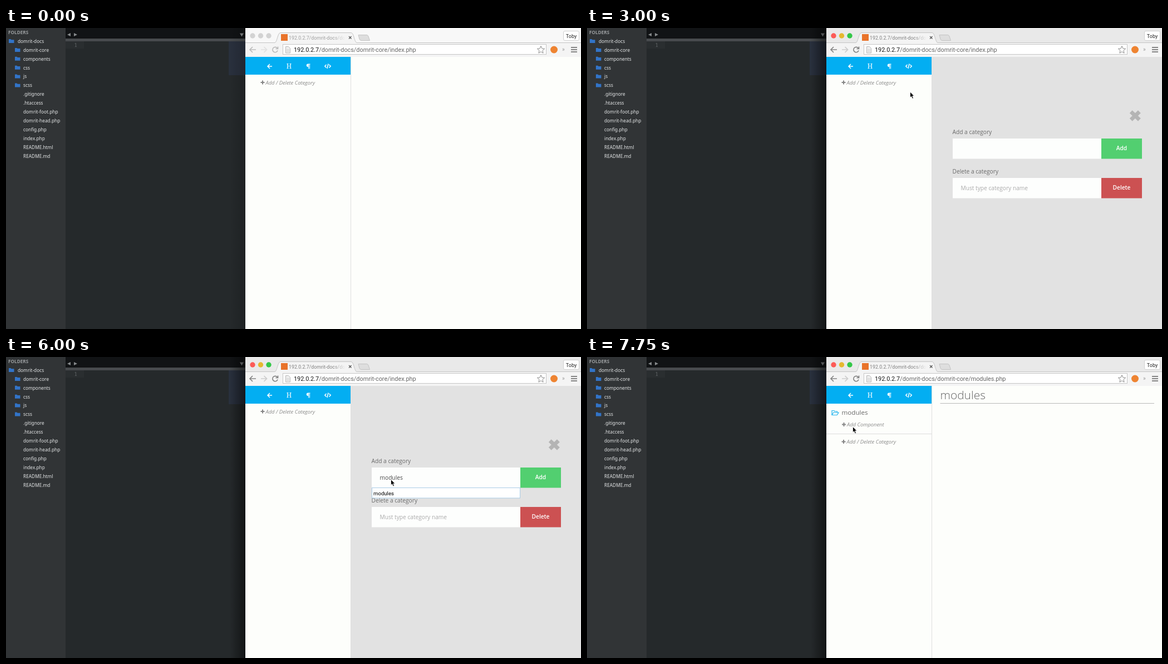
Animation, 1033 px wide and 542 px high, one loop 8 s. Source, as an HTML page:

```html
<!DOCTYPE html>
<html lang="en">
<head>
<meta charset="utf-8">
<title>Adding a category</title>
<style>
  html, body { margin: 0; width: 100%; height: 100%; overflow: hidden; background: #fdfefb; }
  svg { display: block; width: 100%; height: 100%; }
  text { white-space: pre; font-family: "Open Sans", sans-serif; }
  .tree { font: 8.3px "Noto Sans", sans-serif; fill: #e4e6e7; }
  .ui { font-family: Roboto, sans-serif; }
  .form { font-size: 10.2px; fill: #6a6a6a; }
  .button { font-size: 10.2px; fill: #fff; text-anchor: middle; font-weight: 600; }
  .action text { font-size: 9.4px; font-style: italic; fill: #8c8c8c; }
  .action path { stroke: #858585; stroke-width: 2; }
  .icon { fill: none; stroke: #fff; stroke-width: 1.5; }
  .nav { fill: none; stroke: #858585; stroke-width: 1.7; }
  .inactive .nav { stroke: #bcbcbc; }
  .inactive .light { fill: #d3d3d3; }
  .inactive #strip { fill: #f8f8f8; }
  .inactive #tabTitle { fill: #a0a0a0; }
  .inactive #shadow { opacity: .35; }
</style>
</head>
<body>
<svg viewBox="0 0 1033 542">
  <defs>
    <linearGradient id="shade"><stop offset="0" stop-opacity="0"/><stop offset="1" stop-opacity=".5"/></linearGradient>
    <linearGradient id="fade" gradientUnits="userSpaceOnUse" x1="588" x2="610">
      <stop offset="0" stop-color="#fff"/><stop offset="1" stop-color="#fff" stop-opacity="0"/>
    </linearGradient>
    <mask id="titleMask"><rect x="506" y="8" width="104" height="18" fill="url(#fade)"/></mask>
    <path id="folder" fill="#3274c8" d="M0 -3.5h3.6l1 1.2h4.9v5.8h-9.5z"/>
  </defs>

  <!-- Editor -->
  <rect width="430" height="542" fill="#25292b"/>
  <rect x="107" width="323" height="19" fill="#111315"/>
  <rect x="107" y="19" width="323" height="5" fill="#484b4e"/>
  <rect x="107" y="24" width="33" height="13" fill="#2a2e30"/>
  <rect x="400" y="24" width="30" height="61" fill="#29303d"/>
  <path fill="#85888a" d="M116 9v6l-6-3zM122 9v6l6-3zM420 9.5h7l-3.5 6z"/>
  <text x="122.5" y="34" font-size="9" fill="#626668" style="font-family:'Noto Sans Mono',monospace">1</text>
  <rect width="107" height="542" fill="#313436"/>
  <text x="4" y="11" font-size="8.2" font-weight="700" fill="#999c9e">FOLDERS</text>
  <g id="tree"></g>
  <rect id="shadow" x="402" width="28" height="542" fill="url(#shade)"/>

  <!-- Browser -->
  <g id="browser">
    <rect id="strip" x="430" width="603" height="27" fill="#e9e9e9"/>
    <rect x="430" y="26" width="603" height="26" fill="#f4f4f4"/>
    <path d="M430 26.5H483C487 26 488 8.500 493 8.500H620C625 8.500 626 26 630 26.500H1033" fill="#f4f4f4" stroke="#c4c4c4"/>
    <path d="M633 12.500H648Q650 12.500 651 15L653.500 22.500H638Q636 22.500 635 20Z" fill="#dedede" stroke="#c4c4c4"/>
    <circle class="light" cx="443" cy="14" r="4.700" fill="#fc5b57"/>
    <circle class="light" cx="457.500" cy="14" r="4.700" fill="#e5b82f"/>
    <circle class="light" cx="472" cy="14" r="4.700" fill="#33c748"/>
    <rect id="favicon" x="494" y="11" width="12" height="12" fill="#e9732a"/>
    <path id="spinner" d="M501 12.500A4.500 4.500 0 0 1 505.500 17" fill="none" stroke="#8b8b8b" stroke-width="1.200"/>
    <text id="tabTitle" class="ui" x="508" y="20.500" font-size="8.800" fill="#808080" mask="url(#titleMask)">192.0.2.7/domrit-docs/domrit-core</text>
    <path d="M616 15l4.500 4.500m0-4.500l-4.500 4.500" stroke="#555" stroke-width="1.300"/>
    <rect x="1001.500" y="5.500" width="28" height="17" rx="2.500" fill="#fff" stroke="#d0d0d0"/>
    <text class="ui" x="1015.500" y="17.500" font-size="9" text-anchor="middle" fill="#222">Toby</text>

    <path class="nav" d="M449 39H438.500M443 34l-5 5 5 5"/>
    <path class="nav" d="M458 39H468M463.500 34l5 5-5 5" opacity=".35"/>
    <path class="nav" id="reload" d="M487.500 36.500A4.700 4.700 0 1 0 488 40.500M488.500 33.500V37.500H484.500"/>
    <path class="nav" id="stop" d="M479 34.500l9 9m0-9l-9 9"/>
    <rect x="497.500" y="29.500" width="473" height="18" fill="#fff" stroke="#c6c6c6"/>
    <path d="M502.500 33.500h5l3 3v8.500h-8z" fill="#efefef" stroke="#b7b7b7"/>
    <path d="M504 38.500h5m-5 2h5m-5 2h5" stroke="#ccc" stroke-width=".800"/>
    <text class="ui" x="517" y="43" font-size="10.850" fill="#666"><tspan fill="#161616">192.0.2.7</tspan>/domrit-docs/domrit-core/<tspan id="page"></tspan></text>
    <path d="M961 32.500l1.900 4.400 4.700.400-3.600 3.200 1.100 4.700-4.100-2.500-4.100 2.500 1.100-4.700-3.600-3.200 4.700-.400z" fill="none" stroke="#8c8c8c"/>
    <circle cx="984.500" cy="39" r="6.500" fill="#ee8432"/>
    <text class="ui" x="999" y="42" font-size="10" fill="#999">»</text>
    <path d="M1015 35h11m-11 4h11m-11 4h11" stroke="#858585" stroke-width="1.800"/>

    <rect x="430" y="52" width="603" height="490" fill="#fdfefb"/>
    <path d="M619.500 52V542" stroke="#dfdfdf"/>
    <rect x="430" y="52" width="189" height="32" fill="#03aef2"/>
    <path class="icon" d="M478 69H470.500M474 65l-4 4 4 4" stroke-width="2"/>
    <text x="508.500" y="72.800" font-size="12" text-anchor="middle" fill="#fff" style="font-family:'Noto Serif',serif">H</text>
    <path d="M546.500 64.500h-4a2.700 2.700 0 0 0 0 5.400h.500v3.600h1v-8h1v8h1v-8h.500z" fill="#fff"/>
    <path class="icon" d="M575.500 66l-2.700 2.800 2.700 2.800M580.500 66l2.700 2.800-2.700 2.800M579 64.500l-2 8.500" stroke-width="1.300"/>
    <g id="categoryLink" class="action"><path d="M457.500 98h7M461 94.500v7"/><text x="466.500" y="101.500">Add / Delete Category</text></g>
  </g>

  <g id="dialog">
    <rect x="620" y="52" width="413" height="490" fill="#e2e2e2"/>
    <path d="M977.200 150.700l15.200 14.600m0-14.600l-15.200 14.600" stroke="#b4b4b4" stroke-width="7"/>
    <text class="form" x="656.500" y="191">Add a category</text>
    <text class="form" x="656.500" y="262">Delete a category</text>
    <path d="M657 199h267v36.500h-267zM657 270h267v36.500h-267z" fill="#fdfefd"/>
    <rect x="924" y="199" width="73" height="36.500" fill="#52cf70"/>
    <rect x="924" y="270" width="73" height="36.500" fill="#cc5152"/>
    <text class="button" x="960.500" y="220">Add</text>
    <text class="button" x="960.500" y="291">Delete</text>
    <text class="form" x="671.500" y="291.500" style="fill:#aaa">Must type category name</text>
    <text id="typed" class="form" x="671.500" y="220.500" style="fill:#484848"></text>
    <rect id="caret" y="210" width="1" height="14" fill="#333"/>
    <g id="popup">
      <rect id="popupBox" x="657.500" y="235.500" width="266" fill="#fff" stroke="#a9cce6"/>
      <g class="ui" font-size="9.600">
        <text class="ui" x="660" y="248.500">modules</text>
        <g id="moreHints"><text class="ui" x="660" y="265.500">modal</text><text class="ui" x="660" y="282.500">model</text></g>
      </g>
    </g>
  </g>

  <g id="modules">
    <path d="M440 104.500V96.500h4l1 1.500h4.500v2M440 104.500l2.700-4.500h9.300l-2.700 4.500z" fill="none" stroke="#23b4ee" stroke-width="1.200"/>
    <text x="457.500" y="104" font-size="11.600" fill="#686868">modules</text>
    <g class="action"><path d="M458 121.500h7M461.500 118v7"/><text x="467" y="125">Add Component</text></g>
    <path d="M430 138.500h189" stroke="#dcdcdc"/>
    <text x="634.500" y="76" font-size="20.900" font-weight="300" fill="#666">modules</text>
    <path d="M634.500 83.500h384.500" stroke="#b9b9b9"/>
  </g>

  <path id="cursor" d="M0 0V10.300L2.300 8.200 4 12.200 5.900 11.400 4.200 7.500H7.300Z" fill="#000" stroke="#fff" stroke-width=".800"/>
</svg>

<script>
const LOOP = 8000;
const $ = id => document.getElementById(id);
const show = (id, visible) => { $(id).style.display = visible ? "" : "none"; };

// Each entry is [start time, ...value]; the latest started one applies.
const POINTER = [
  [750, 588, 23], [1000, 505, 92], [1250, 505, 94], [1500, 505, 95], [2250, 505.5, 97],
  [2500, 506.5, 100.5], [3000, 580.5, 115], [3250, 689.5, 183.500], [3500, 691.5, 220.5],
  [7000, 537, 147.5], [7250, 494, 135.5], [7500, 479, 128], [7750, 477.5, 125.5]
];
const TYPING = [
  [0, ""], [4250, "m"], [4500, "mo"], [4750, "mod"],
  [5000, "modu"], [5250, "module"], [5500, "modules"]
];
const latest = (steps, t) => steps.filter(step => step[0] <= t).pop();

function buildTree() {
  const folders = ["domrit-core", "components", "css", "js", "scss"];
  const files = [".gitignore", ".htaccess", "domrit-foot.php", "domrit-head.php",
    "config.php", "index.php", "README.html", "README.md"];
  $("tree").innerHTML = ["domrit-docs", ...folders, ...files].map((name, row) => {
    const y = 24 + row * 15.9;
    const icon = row <= folders.length ? `<use href="#folder" x="${row ? 16 : 5}" y="${y - .5}"/>` : "";
    return `${icon}<text class="tree" x="${row ? 31 : 21}" y="${y + 2.8}">${name}</text>`;
  }).join("");
}

function draw(t) {
  const loading = t >= 6250 && t < 6750;
  const done = t >= 6750;

  $("browser").classList.toggle("inactive", t < 1500);
  $("shadow").style.opacity = t < 1500 ? .35 : 1;
  $("page").textContent = t < 6250 ? "index.php" : "modules.php";
  show("favicon", !loading);
  show("reload", !loading);
  show("spinner", loading);
  show("stop", loading);
  $("spinner").setAttribute("transform", `rotate(${t < 6500 ? -110 : 0} 501 17)`);

  show("dialog", t >= 3000 && !done);
  show("modules", done);
  $("categoryLink").setAttribute("transform", `translate(0 ${done ? 54.5 : 0})`);

  const typed = latest(TYPING, t)[1];
  $("typed").textContent = typed;
  show("caret", t >= 3750 && t < 6000);
  $("caret").setAttribute("x", Math.round(671 + (typed ? $("typed").getComputedTextLength() : 0)));

  const manyHints = t < 5000;
  show("popup", t >= 4250 && t < 6250);
  show("moreHints", manyHints);
  $("popupBox").setAttribute("height", manyHints ? 53 : 18.5);

  const pointer = latest(POINTER, t);
  show("cursor", pointer);
  if (pointer) $("cursor").setAttribute("transform", `translate(${pointer[1]} ${pointer[2]})`);
}

function tick() {
  draw(performance.now() % LOOP);
  requestAnimationFrame(tick);
}

buildTree();
tick();
</script>
</body>
</html>
```
